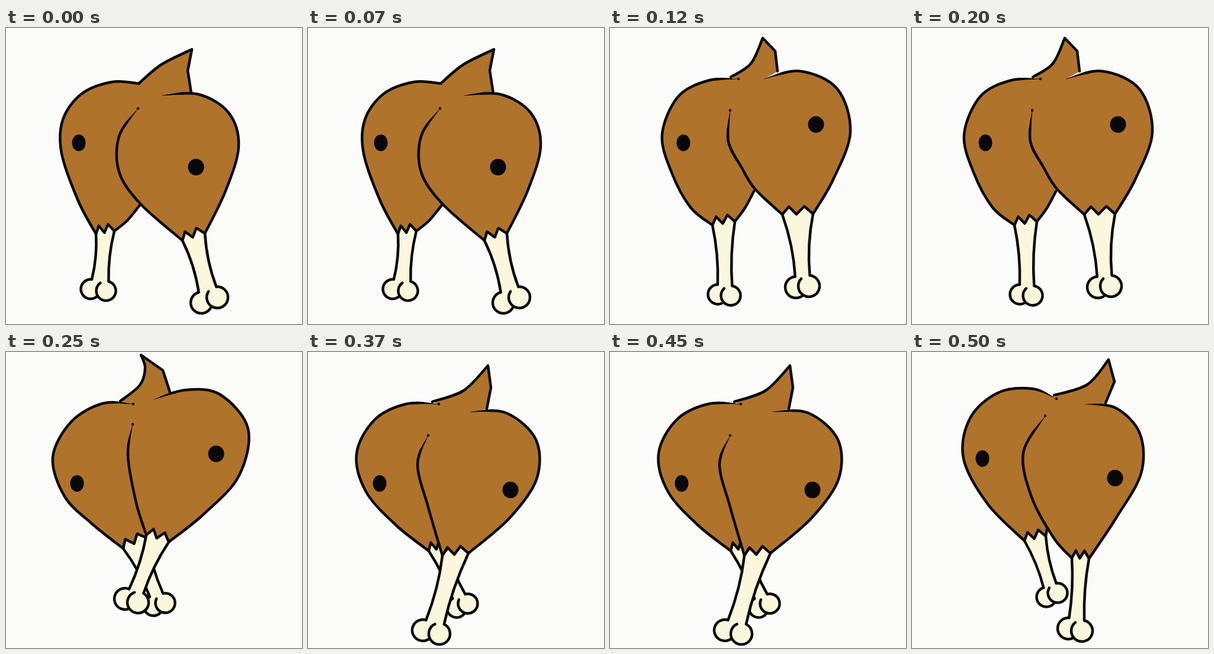
Write an HTML page that moves like this. It is 500 by 500 pixels and loops after 0.62 s.

```html
<!DOCTYPE html>
<html lang="en">
<head>
<meta charset="utf-8">
<title>Strutting drumsticks</title>
<style>
  html, body { margin: 0; width: 100%; height: 100%; overflow: hidden; background: #fbfcfa; }
  svg { display: block; width: 100vw; height: 100vh; }
  .meat { fill: #b0732b; stroke: #b0732b; }
  .bone { fill: #faf7dd; }
  .eye { fill: #080808; }
  .line { fill: none; stroke: #080808; stroke-width: 4.5; stroke-linecap: round; stroke-linejoin: round; }
</style>
</head>
<body>
<svg id="stage" viewBox="0 0 500 500"></svg>
<script>
const NS = 'http://www.w3.org/2000/svg';
const stage = document.getElementById('stage');
const FADE = 36;               // length of a brush line's thin end
const FAR = 16.5, NEAR = 18;   // knob radius of each leg

// Key points of smooth curves. Each thigh is its line down to the ankle
// and its line up from the ankle; feet are the back and front knob.
const poses = [
  {
    tail: ['224,94 262,62 314,36', '307,72 313,110'],
    left: ['225,94 180,91 128,111 96,155 94,212 122,292 152,348', '183,343 205,325 227,298'],
    right: ['223,136 191,183 191,243 227,297 298,359', '336,347 371,275 393,200 376,143 325,112 263,114'],
    eyes: '123,194 321,235',
    feet: ['143,441 169,444', '330,464 357,455']
  },
  {
    tail: ['204,83 238,60 258,17', '279,39 283,73'],
    left: ['217,86 165,89 115,116 88,180 104,244 136,303 173,333', '211,327 228,304 243,276'],
    right: ['203,139 200,192 222,235 245,272 291,315', '343,314 377,256 406,176 384,103 322,73 260,86'],
    eyes: '124,194 348,163',
    feet: ['182,450 204,452', '314,438 336,436']
  },
  {
    tail: ['193,83 226,56 235,27 228,5', '265,31 277,68'],
    left: ['215,88 163,87 110,118 79,178 99,244 145,290 198,332', '238,314 238,304'],
    right: ['214,122 206,175 220,255 237,309', '275,321 335,273 393,210 409,130 362,72 305,64 250,80'],
    eyes: '120,222 355,172',
    feet: ['249,429 269,424', '201,417 223,423']
  },
  {
    tail: ['210,84 263,65 304,23', '309,60 302,96'],
    left: ['221,88 165,88 112,115 82,172 98,236 148,292 204,336', '232,330 230,300'],
    right: ['203,141 185,190 203,262 227,344', '271,340 340,281 386,215 385,148 335,103 274,101'],
    eyes: '121,222 342,233',
    feet: ['251,432 270,425', '194,470 222,476']
  },
  {
    tail: ['240,73 296,55 332,13', '342,50 327,86'],
    left: ['244,79 203,62 145,69 98,112 87,180 128,257 190,319', '226,311 228,299'],
    right: ['225,108 188,170 202,245 240,315 270,348', '299,349 345,280 387,205 385,138 345,95 293,88'],
    eyes: '119,180 343,213',
    feet: ['227,414 246,407', '264,467 287,471']
  }
];

const points = s => s.split(' ').map(p => p.split(',').map(Number));
const mix = (a, b, k) => a.map((v, i) => v + (b[i] - v) * k);
const angle = (a, b) => Math.atan2(b[1] - a[1], b[0] - a[0]);
const polar = (c, r, a) => [c[0] + r * Math.cos(a), c[1] + r * Math.sin(a)];

function add(parent, tag, attrs) {
  const el = document.createElementNS(NS, tag);
  for (const key in attrs) el.setAttribute(key, attrs[key]);
  return parent.appendChild(el);
}
const path = (g, cls, d) => add(g, 'path', { class: cls, d });

// Catmull-Rom spline
function curve(p) {
  let d = 'M' + p[0];
  for (let i = 0; i < p.length - 1; i++) {
    const [b, c] = [p[i], p[i + 1]], a = p[i - 1] || b, e = p[i + 2] || c;
    const h1 = b.map((v, k) => v + (c[k] - a[k]) / 6);
    const h2 = c.map((v, k) => v - (e[k] - b[k]) / 6);
    d += `C${h1} ${h2} ${c}`;
  }
  return d;
}
const join = (...parts) => parts.map((d, i) => i ? d.replace('M', 'L') : d).join('');

// Torn edge with two teeth
function teeth(a, b) {
  const up = angle(a, b) - Math.PI / 2;
  const tip = k => polar(mix(a, b, k), 13, up);
  return `M${tip(0.22)}L${mix(a, b, 0.46)}L${tip(0.72)}`;
}

// Brush line whose chosen ends thin out to a point
function brush(g, d, thinStart, thinEnd) {
  const el = path(g, 'line', d), total = el.getTotalLength();
  const head = thinStart ? FADE : 0, foot = thinEnd ? FADE : 0;
  el.setAttribute('stroke-dasharray', `0 ${head} ${total - head - foot} ${total}`);
  const dab = (s, w) => {
    const a = el.getPointAtLength(s), b = el.getPointAtLength(s + 2);
    path(g, 'line', `M${a.x},${a.y}L${b.x},${b.y}`).style.strokeWidth = w;
  };
  for (let s = 0; s < FADE; s += 2) {
    const w = 0.4 + 4.1 * s / FADE;
    if (thinStart) dab(s, w);
    if (thinEnd) dab(total - s - 2, w);
  }
}

function leg(g, a, b, feet, r) {
  const [back, front] = points(feet);
  const hip = mix(a, b, 0.5), foot = mix(back, front, 0.5), up = angle(foot, hip);
  const endA = polar(back, r, up), endB = polar(front, r, up + 0.15);
  const waist = mix(hip, mix(endA, endB, 0.5), 0.5);
  const pinch = (p, q) => mix(mix(p, q, 0.5), waist, 0.4);
  const arc = (c, from, turn) =>
    `M${polar(c, r, from)}A${r} ${r} 0 1 ${turn > 0 ? 1 : 0} ${polar(c, r, from + turn)}`;
  const sideA = `M${a}Q${pinch(a, endA)} ${endA}`;
  const sideB = `M${endB}Q${pinch(b, endB)} ${b}`;
  const rear = arc(back, up, -4.6);

  path(g, 'bone', rear);
  path(g, 'line', rear);
  add(g, 'circle', { class: 'bone', cx: front[0], cy: front[1], r });
  path(g, 'bone', join(sideA, `L${back}L${front}`, sideB, `L${mix(foot, hip, 1.2)}Z`));
  path(g, 'line', sideA + sideB + arc(front, up + 0.15, 5.4));
}

function thigh(g, [down, up], feet, r, thinStart, thinEnd) {
  const a = points(down), b = points(up), ankle = a[a.length - 1];
  leg(g, ankle, b[0], feet, r);
  const d = join(curve(a), teeth(ankle, b[0]), curve(b));
  path(g, 'meat', d + 'Z');
  brush(g, d, thinStart, thinEnd);
}

function build(pose, i) {
  const g = add(stage, 'g', { visibility: 'hidden' });
  const first = s => s.split(' ')[0], last = s => s.split(' ').pop();
  const tail = join(...pose.tail.map(s => curve(points(s))));
  const patch = [last(pose.right[1]), first(pose.right[0]), first(pose.left[0])];

  path(g, 'meat', `${tail}L${patch.join('L')}Z`);
  path(g, 'line', tail);
  thigh(g, pose.left, pose.feet[0], FAR, i > 0, false);
  thigh(g, pose.right, pose.feet[1], NEAR, true, true);
  points(pose.eyes).forEach(([cx, cy], k) =>
    add(g, 'ellipse', { class: 'eye', cx, cy, rx: k ? 13.5 : 11.5, ry: 14 }));
  return g;
}

const groups = poses.map(build);
const ends = [];
poses.forEach((_, i) => ends.push((ends[i - 1] || 0) + 120 + 10 * (i % 2)));
const loop = ends[ends.length - 1];

function draw(ms) {
  const now = ends.findIndex(end => ms % loop < end);
  groups.forEach((g, i) => g.setAttribute('visibility', i === now ? 'visible' : 'hidden'));
}

const begin = performance.now();
function tick() {
  draw(performance.now() - begin);
  requestAnimationFrame(tick);
}
tick();
</script>
</body>
</html>
```
